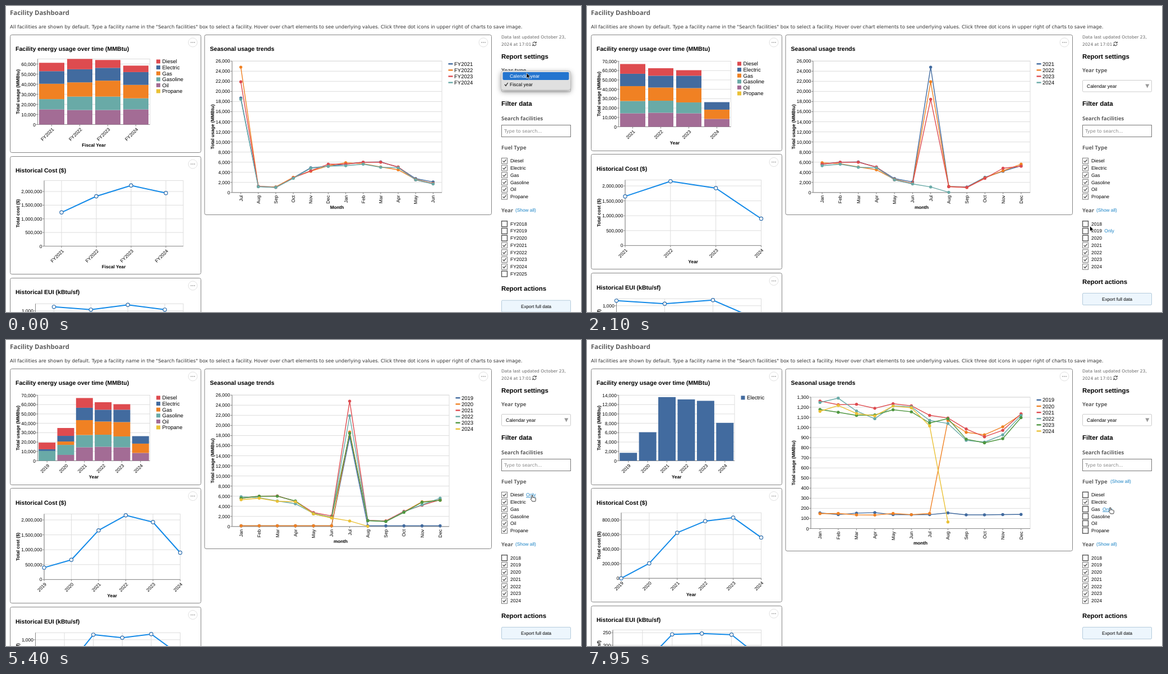
These frames come from a looping animation (1025 by 546 pixels, 8 s). An HTML page:

```html
<!DOCTYPE html>
<html lang="en">
<head>
<meta charset="utf-8">
<title>Facility Dashboard</title>
<style>
  html, body { margin: 0; width: 100%; height: 100%; overflow: hidden; background: #fff; }
  svg { display: block; font-family: "Liberation Sans", Arial, sans-serif; fill: #000; text-rendering: geometricPrecision; }
  .wide { font-family: "DejaVu Sans", Verdana, sans-serif; }
  .head { font-family: "Open Sans", sans-serif; font-weight: bold; fill: #5f5f5f; }
  .gray { fill: #666; }
  .bold { font-weight: bold; }
  .link { fill: #1680c4; }
  .grid { stroke: #ddd; fill: none; }
  .axis { stroke: #888; fill: none; }
  .box { fill: #fff; stroke: #858585; }
</style>
</head>
<body>
<svg id="stage" width="1025" height="546" viewBox="0 0 1025 546"></svg>
<script>
const LOOP = 8000;
const BLUE = '#426b9f', ORANGE = '#f08123', RED = '#de4b4f', TEAL = '#69aaa7',
      PURPLE = '#a36c95', GREEN = '#4f9740', YELLOW = '#eac136';
const SERIES = [BLUE, ORANGE, RED, TEAL, GREEN, YELLOW];
const FUELS = ['Diesel', 'Electric', 'Gas', 'Gasoline', 'Oil', 'Propane'];
const FUEL_COLORS = [RED, BLUE, ORANGE, TEAL, PURPLE, YELLOW];
const STACK = [PURPLE, TEAL, ORANGE, BLUE, RED];
const MONTHS = 'Jan Feb Mar Apr May Jun Jul Aug Sep Oct Nov Dec'.split(' ');
const FISCAL_MONTHS = [...MONTHS.slice(6), ...MONTHS.slice(0, 6)];
const LABEL = 8.35, AXIS_TITLE = 8.2, LEGEND = 9.5;

const range = (a, b) => Array.from({ length: b - a + 1 }, (_, i) => a + i);
const low = n => Array(n).fill(.15);

// Thousands of MMBtu per month, July to June.
const fiscalUse = {
  2019: low(12),
  2020: [17.7, ...low(11)],
  2021: [18.7, 1.2, 1.1, 2.9, 4.9, 5.2, 5.6, 6, 6.05, 5, 2.75, 2.1],
  2022: [24.8, 1.2, 1.1, 3, 4.2, 5.3, 5.9, 5.7, 5.05, 4.5, 2.6, 1.8],
  2023: [21.9, 1.2, 1, 2.9, 4.3, 5.6, 5.6, 6, 6, 5.05, 2.5, 1.75],
  2024: [18.45, 1.15, 1, 2.8, 4.8, 5.2, 5.3, 5.6, 5, 4.9, 2.5, 1.7],
  2025: [1.1, .05]
};
const calendarUse = y => [...fiscalUse[y].slice(6), ...fiscalUse[y + 1].slice(0, 6)];

const electricUse = [
  [155, 138, 153, 158, 138, 137, 138, 155, 136, 136, 139, 140],
  [148, 150, 136, 134, 150, 138, 150, 1070, 952, 928, 1007, 1128],
  [1262, 1225, 1230, 1190, 1235, 1215, 1120, 1094, 985, 908, 972, 1135],
  [1248, 1290, 1163, 1087, 1214, 1205, 1070, 1040, 873, 855, 927, 1120],
  [1178, 1150, 1120, 1124, 1175, 1155, 1045, 1088, 885, 848, 890, 1098],
  [1160, 1218, 1138, 1115, 1212, 1195, 1016, 65]
].map(row => row.map(v => v / 1000));

// Cumulative bar tops per year in stack order.
const fiscalBars = [[15, 25.2, 40.4, 52.9, 61.2], [14.4, 27.7, 41.8, 54.8, 65],
  [14.4, 27.7, 43.5, 56.2, 64], [15, 26, 39.3, 52, 58.4]];
const calendarBars = {
  2019: [0, 10.5, 10.5, 12.3, 19.4],
  2020: [6.3, 17, 20.6, 26.6, 35],
  2021: [14.4, 27.5, 43.4, 56.6, 67],
  2022: [15, 27.8, 41.9, 54.5, 62.5],
  2023: [14.4, 26, 41.3, 54.5, 60.4],
  2024: [8.4, 8.4, 18.3, 26.3, 26.3]
};
const calendarCost = { 2019: 400, 2020: 660, 2021: 1650, 2022: 2155, 2023: 1925, 2024: 900 };
const calendarEui = { 2019: 450, 2020: 470, 2021: 1086, 2022: 1034, 2023: 1096, 2024: 737 };

const text = (x, y, str, size, cls = '', attr = '') =>
  `<text x="${x}" y="${y + size * .36}" font-size="${size}" class="${cls}" ${attr}>${str}</text>`;
const line = (x1, y1, x2, y2, cls) => `<path d="M${x1} ${y1}L${x2} ${y2}" class="${cls}"/>`;
const rect = (x, y, w, h, attr) => `<rect x="${x}" y="${y}" width="${w}" height="${h}" ${attr}/>`;
const turned = (x, y, angle, anchor) =>
  `text-anchor="${anchor}" transform="rotate(${angle} ${x} ${y})"`;
const snap = v => Math.floor(v) + .5;

function panel(x, y, w, bottom, title) {
  const cx = x + w - 14.5, cy = y + 14, top = snap(y);
  return rect(x, top, w, snap(bottom) - top, 'rx="3" class="box"') +
    text(x + 9.5, y + 25.5, title, 10.55, 'bold') +
    `<circle cx="${cx}" cy="${cy}" r="8" fill="#fff" stroke="#e2e2e2"/>` +
    [-3, 0, 3].map(d => `<circle cx="${cx + d}" cy="${cy}" r="1" fill="#aaa"/>`).join('');
}

const scaleY = c => v => c.y + c.h - v / c.max * c.h;

function axes(c) {
  const Y = scaleY(c), base = c.y + c.h;
  let out = rect(c.x, c.y, c.w, c.h, 'class="grid"');
  for (let i = 0; i * c.step <= c.max + 1e-6; i++) {
    const y = Y(i * c.step);
    out += line(c.x, y, c.x + c.w, y, 'grid') + line(c.x - 3, y, c.x, y, 'axis') +
      text(c.x - 3.7, y, Math.round(i * c.step * c.unit).toLocaleString('en-US'), LABEL, '', 'text-anchor="end"');
  }
  c.cols.forEach(([x, label]) => {
    if (c.grid) out += line(x, c.y, x, base, 'grid');
    const lx = c.tilt === -45 ? x + 2.5 : x, ly = base + (c.tilt === -45 ? 7 : 5);
    out += line(x, base, x, base + 3, 'axis') +
      text(lx, ly, label, LABEL, '', turned(lx, ly, c.tilt, 'end'));
  });
  const my = c.y + c.h / 2;
  return out + line(c.x, c.y, c.x, base, 'axis') + line(c.x, base, c.x + c.w, base, 'axis') +
    text(c.x + c.w / 2, base + c.drop, c.xTitle, AXIS_TITLE, 'bold', 'text-anchor="middle"') +
    text(c.titleX, my, c.yTitle, AXIS_TITLE, 'bold', turned(c.titleX, my, -90, 'middle'));
}

const bandCols = (x, w, names) => names.map((n, i) => [x + w * (i + .5) / names.length, n]);
const spanCols = (x, w, names) => names.map((n, i) => [x + w * i / (names.length - 1), n]);

const polyline = (pts, color, width) =>
  `<polyline points="${pts.join(' ')}" fill="none" stroke="${color}" stroke-width="${width}" stroke-linejoin="round"/>`;

function barChart(s, common) {
  const c = { x: 56.5, h: 117, unit: 1000, tilt: -45, titleX: 21, yTitle: 'Total usage (MMBtu)', ...common, ...s.bar };
  c.cols = bandCols(c.x, c.w, s.names);
  const Y = scaleY(c), width = c.w / s.names.length * .9;
  let out = panel(7.5, 51, 340, c.y + c.h + c.drop + 13.5, 'Facility energy usage over time (MMBtu)') + axes(c);
  s.bars.forEach((tops, i) => tops.forEach((v, k) => {
    const from = k ? tops[k - 1] : 0;
    if (v > from) out += rect(c.cols[i][0] - width / 2, Y(v), width, Y(from) - Y(v), `fill="${s.stack[k]}"`);
  }));
  s.fuels.forEach((f, i) => {
    const x = c.x + c.w + 11.5, y = c.y + 4.5 + i * 10.6;
    out += rect(x, y - 3.5, 7, 7, `fill="${FUEL_COLORS[f]}"`) + text(x + 10.5, y, FUELS[f], LEGEND);
  });
  return out;
}

function trendChart(s, opts, top, title, common) {
  const c = { h: 117, tilt: -45, grid: true, titleX: 21, ...common, ...opts };
  c.cols = (s.fiscal ? bandCols : spanCols)(c.x, c.w, s.names);
  const Y = scaleY(c), pts = c.data.map((v, i) => [c.cols[i][0], Y(v)]);
  return panel(7.5, top, 340, c.y + c.h + c.drop + 13.5, title) + axes(c) + polyline(pts, '#138ae8', 2) +
    pts.map(p => `<circle cx="${p[0]}" cy="${p[1]}" r="3.1" fill="#fff" stroke="#2f6fae" stroke-width="1.2"/>`).join('');
}

function seasonalChart(s) {
  const c = { x: 403, y: 98.3, w: 387, h: 234.5, unit: 1000, tilt: -90, drop: 26, titleX: 368,
    xTitle: s.fiscal ? 'Month' : 'month', yTitle: 'Total usage (MMBtu)', ...s.season };
  c.cols = bandCols(c.x, c.w, c.months || MONTHS);
  c.grid = c.cols.length === 1;
  const Y = scaleY(c);
  let out = panel(354, 51, 511.5, c.y + c.h + c.drop + 13.5, 'Seasonal usage trends') + axes(c);
  s.use.forEach((row, i) => {
    const pts = row.map((v, k) => [c.cols[k][0], Y(v)]), y = c.y + 5 + i * 11.1, x = c.x + c.w + 11.5;
    out += polyline(pts, SERIES[i], 1.4) +
      pts.map(p => `<circle cx="${p[0]}" cy="${p[1]}" r="2.7" fill="${SERIES[i]}"/>`).join('') +
      rect(x, y - 1.2, 8, 2.4, `fill="${SERIES[i]}"`) + text(x + 10.5, y, s.names[i], LEGEND);
  });
  return out;
}

const rowY = i => i < 6 ? 276.3 + 12.75 * i : 388.7 + 12.75 * (i - 6);

function checkRow(i, label, on) {
  const y = rowY(i);
  return rect(883.5, y - 5, 10, 10, `fill="#fff" stroke="${on ? '#777' : '#555'}" stroke-width="${on ? 1 : 1.4}"`) +
    (on ? `<path d="M885.7 ${y}l2 2.3 3.8-4.6" fill="none" stroke="#444" stroke-width="1.2"/>` : '') +
    text(899, y, label, 8.47);
}

function sidebar(s) {
  const years = range(2018, s.fiscal ? 2025 : 2024), y = rowY(6 + years.length) + 13.5;
  let out = FUELS.map((f, i) => checkRow(i, f, s.fuels.includes(i))).join('') +
    years.map((n, i) => checkRow(6 + i, (s.fiscal ? 'FY' : '') + n, n >= s.from && n < 2025)).join('');
  if (s.fuels.length === 1) out += text(933, 252.5, '(Show all)', 8.3, 'link');
  return out + text(883, y, 'Report actions', 11.45, 'bold') +
    rect(883.5, y + 21, 123, 21, 'rx="1.5" fill="#edf6fd" stroke="#b5cbdc"') +
    text(945, y + 31.5, 'Export full data', 8.1, '', 'text-anchor="middle"');
}

function drawScene(s) {
  const common = { drop: s.fiscal ? 36.5 : 29, xTitle: s.fiscal ? 'Fiscal Year' : 'Year' };
  const costTop = s.bar.y + 117 + common.drop + 20, euiTop = s.cost.y + 117 + common.drop + 20;
  return barChart(s, common) +
    trendChart(s, { unit: 1000, yTitle: 'Total cost ($)', ...s.cost }, costTop, 'Historical Cost ($)', common) +
    trendChart(s, { unit: 1, yTitle: 'Annual EUI (kBtu/sf)', ...s.eui }, euiTop, 'Historical EUI (kBtu/sf)', common) +
    seasonalChart(s) + sidebar(s);
}

function calendarScene(start, from) {
  const names = range(from, 2024);
  return {
    start, from, names, fuels: range(0, 5), stack: STACK,
    bars: names.map(n => calendarBars[n]),
    bar: { y: 98.5, w: 200, max: 70, step: 10 },
    cost: { x: 68, y: 310.4, w: 242.5, max: 2200, step: 500, data: names.map(n => calendarCost[n]) },
    eui: { x: 52.5, y: 522.3, w: 258, max: 1120, step: 200, data: names.map(n => calendarEui[n]) },
    season: { max: 26, step: 2 },
    use: names.map(calendarUse)
  };
}

const dieselUse = [7.13, 8.05, 10, 7.55, 5.95];
const scenes = [
  {
    start: 0, fiscal: true, from: 2021, names: range(2021, 2024).map(n => 'FY' + n),
    fuels: range(0, 5), stack: STACK, bars: fiscalBars,
    bar: { y: 94.5, w: 200, max: 65, step: 10 },
    cost: { x: 68, y: 311.5, w: 248, max: 2400, step: 500, data: [1235, 1825, 2220, 1945] },
    eui: { x: 52.5, y: 531.3, w: 263.5, max: 1120, step: 200, data: [1067, 1019, 1101, 1019] },
    season: { w: 374, max: 26, step: 2, months: FISCAL_MONTHS },
    use: range(2021, 2024).map(n => fiscalUse[n])
  },
  calendarScene(300, 2021),
  calendarScene(2700, 2020),
  calendarScene(3700, 2019),
  {
    start: 5700, from: 2019, names: range(2019, 2023), fuels: [0], stack: [RED],
    bars: dieselUse.map(v => [v]),
    bar: { y: 94.5, w: 211, max: 11, step: 2 },
    cost: { x: 61, y: 308.2, w: 249.5, max: 300, step: 50, data: [156, 141, 237, 298, 167] },
    eui: { x: 36, y: 517.3, w: 274.5, max: 1, step: 5, data: [] },
    season: { max: 11, step: 1, months: ['Jul'], drop: 20.8 },
    use: dieselUse.map(v => [v])
  },
  {
    start: 6800, from: 2019, names: range(2019, 2024), fuels: [1], stack: [BLUE],
    bars: [1.7, 6.1, 13.6, 13.1, 12.8, 8.1].map(v => [v]),
    bar: { y: 98.5, w: 206.5, max: 14, step: 2 },
    cost: { x: 61, y: 308.2, w: 249.5, max: 900, step: 200, data: [0, 205, 625, 785, 833, 560] },
    eui: { x: 46, y: 517.3, w: 264.5, max: 261, step: 50, data: [0, 120, 243, 246.5, 242, 149] },
    season: { x: 399, y: 102, w: 391, max: 1.3, step: .1 },
    use: electricUse
  }
];

const backdrop =
  text(7, 12, 'Facility Dashboard', 11.45, 'head') +
  text(7, 36.5, 'All facilities are shown by default. Type a facility name in the "Search facilities" box to select a facility. Hover over chart elements to see underlying values. Click three dot icons in upper right of charts to save image.', 8.48, 'wide', 'fill="#333"') +
  text(883, 55.5, 'Data last updated October 23,', 7.56, 'wide gray') +
  text(883, 68, '2024 at 17:01', 7.56, 'wide gray') +
  '<path d="M939 67a3 3 0 0 1 5.6-1.3M945 68a3 3 0 0 1-5.6 1.3M945.2 63.6v2.4h-2.4M938.8 71.4v-2.4h2.4" fill="none" stroke="#222"/>' +
  text(883, 89.5, 'Report settings', 11.45, 'bold') +
  text(883, 114.5, 'Year type', 9.45, 'head') +
  rect(883.5, 132.5, 123, 20.5, 'rx="1.5" fill="#fff" stroke="#ccc"') +
  text(891, 143, 'Calendar year', 8.5) +
  '<path d="M995.3 139.5h7l-3.5 7z" fill="#999"/>' +
  text(883, 173.5, 'Filter data', 11.45, 'bold') +
  text(883, 200.5, 'Search facilities', 9.45, 'head') +
  rect(883.5, 212.5, 123, 21, 'fill="#fff" stroke="#777"') +
  text(888, 223.5, 'Type to search...', 8.2, 'wide', 'fill="#888"') +
  text(883, 252.5, 'Fuel Type', 9.45, 'head') +
  text(883, 364.5, 'Year', 9.45, 'head') +
  text(908, 364.5, '(Show all)', 8.3, 'link');

const menu = '<g id="menu">' +
  rect(882.5, 115.5, 124, 34.5, 'rx="4" fill="#e0e0e0" stroke="#bbb" stroke-width=".7" style="filter:drop-shadow(0 3px 5px #0006)"') +
  rect(885.5, 118, 118, 14, 'id="pick" rx="2" fill="#2475cf"') +
  text(898, 125.3, 'Calendar year', 8.47, '', 'id="pickText"') +
  '<path d="M889 139.8l2 2.6 3.6-5.4" fill="none" stroke="#222" stroke-width="1.2"/>' +
  text(898, 139.6, 'Fiscal year', 8.47) + '</g>';

const pointer = '<g id="pointer">' +
  '<path id="arrow" d="M0 0V9.6L2.2 7.6 3.7 11.1 5.3 10.4 3.8 7H6.8Z" fill="#000" stroke="#fff" stroke-width=".7"/>' +
  '<path id="hand" d="M-1 1a1 1 0 0 1 2 0v3.2l.3-.2a1 1 0 0 1 1.7.5 1 1 0 0 1 1.7.5 1 1 0 0 1 1.5 1v2.2q0 1.5-.8 2.8h-5.2q-.9-1.8-2.8-3.8a.95.95 0 0 1 1.4-1.2l.2.2z" fill="#fff" stroke="#222" stroke-width=".9"/></g>';

const $ = id => document.getElementById(id);
$('stage').innerHTML = backdrop +
  scenes.map((s, i) => `<g id="scene${i}">${drawScene(s)}</g>`).join('') +
  '<g id="hover"></g>' + menu + pointer;

// time, x, y, pointer kind, hovered row (-1 for none)
const path = [
  [0, 928, 119.5, 'arrow', -1], [450, 928, 119.5, 'arrow', -1], [850, 930, 250, 'arrow', -1],
  [950, 931, 285, 'arrow', 1], [1020, 931, 310, 'arrow', 3], [1100, 931, 338, 'arrow', 5],
  [1200, 930, 366, 'hand', 5], [1250, 930, 373, 'hand', 5], [1320, 927, 376, 'arrow', -1],
  [1700, 914, 384, 'arrow', 6], [2050, 897.5, 392, 'arrow', 7], [2100, 896.5, 392.5, 'arrow', 7],
  [2400, 888, 411, 'hand', 8], [3000, 888, 411, 'hand', 8], [3350, 889, 398.5, 'hand', 7],
  [4350, 889, 398.5, 'hand', 7], [4550, 896, 385, 'arrow', 6], [4700, 905, 370, 'arrow', -1],
  [4900, 920, 342, 'arrow', 5], [5050, 928, 320, 'arrow', 3], [5150, 932, 306, 'arrow', 2],
  [5250, 936, 290, 'arrow', 1], [5350, 938, 277, 'link', 0], [6000, 938, 277, 'link', 0],
  [6350, 941, 287, 'link', 1], [6550, 942, 293, 'link', 1], [7650, 942, 293, 'link', 1],
  [7850, 936, 298, 'link', 2], [7950, 933, 299, 'link', 2], [LOOP, 933, 299, 'link', 2]
];

const show = (el, on) => { el.style.display = on ? '' : 'none'; };
let hoverKey = '';

function setHover(row, underlined) {
  const key = row + '/' + underlined;
  if (key === hoverKey) return;
  hoverKey = key;
  const label = row < 6 ? FUELS[row] : 2012 + row;
  $('hover').innerHTML = row < 0 ? '' : text(899, rowY(row),
    `<tspan visibility="hidden">${label}</tspan><tspan dx="4.5" class="link"${underlined ? ' text-decoration="underline"' : ''}>Only</tspan>`, 8.47);
}

function render(now) {
  const t = now % LOOP;
  const current = scenes.findLastIndex(s => t >= s.start);
  scenes.forEach((s, i) => show($('scene' + i), i === current));

  const lit = t < 50 || t >= 100;
  show($('menu'), t < 300);
  $('menu').style.opacity = t < 150 ? 1 : Math.max(0, 1 - (t - 150) / 150);
  show($('pick'), lit);
  $('pickText').style.fill = lit ? '#fff' : '#111';

  const i = path.findLastIndex(k => t >= k[0]);
  const [t0, x0, y0, kind, row] = path[i], [t1, x1, y1] = path[i + 1];
  const p = (t - t0) / (t1 - t0);
  $('pointer').setAttribute('transform', `translate(${x0 + (x1 - x0) * p} ${y0 + (y1 - y0) * p})`);
  show($('arrow'), kind === 'arrow');
  show($('hand'), kind !== 'arrow');
  setHover(row, kind === 'link');
}

const begin = performance.now();
function tick() {
  render(performance.now() - begin);
  requestAnimationFrame(tick);
}
tick();
</script>
</body>
</html>
```
